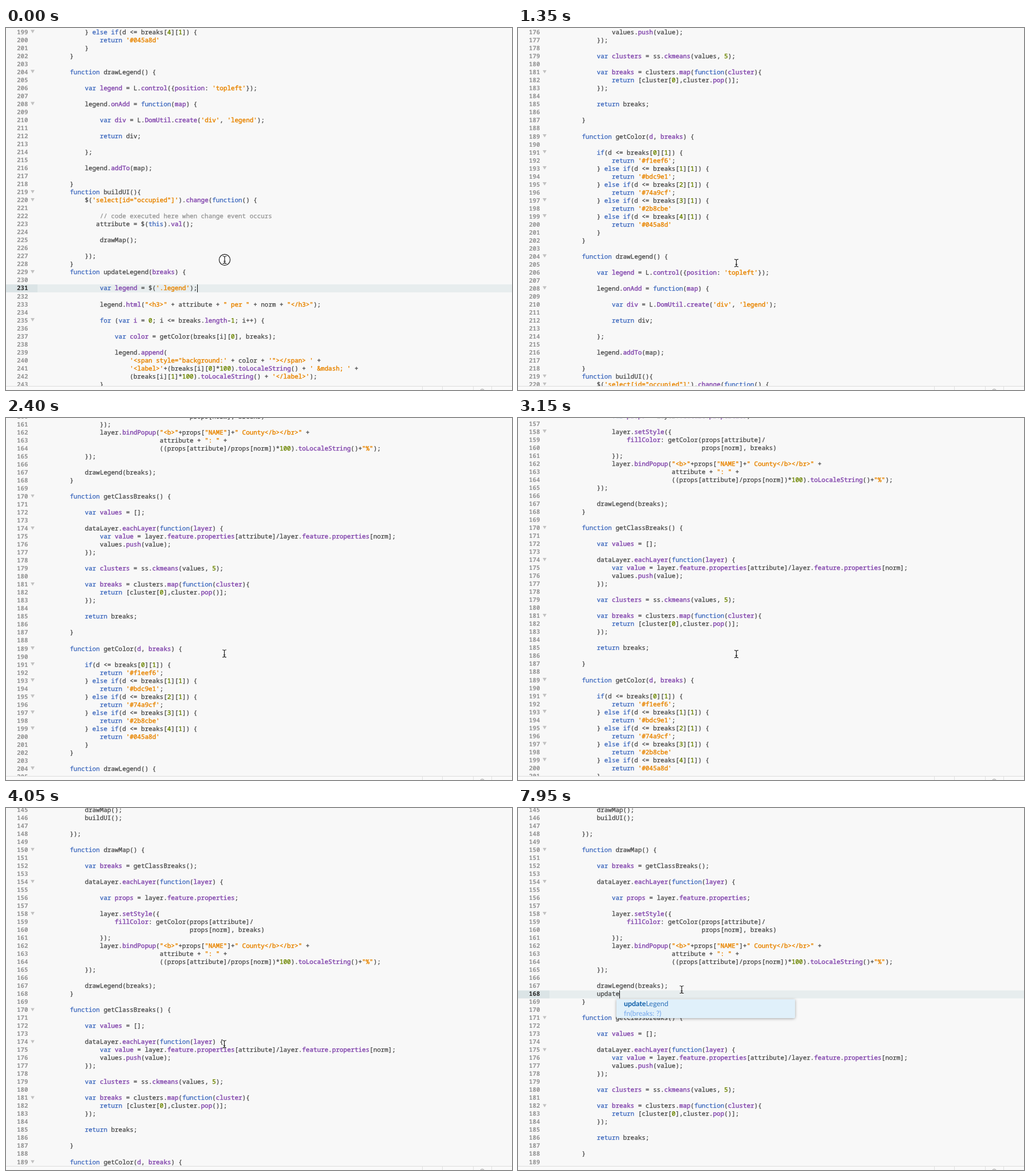
An HTML page for the animation above (8 s loop, 884x634 px).

```html
<!DOCTYPE html>
<html lang="en">
<head>
<meta charset="utf-8">
<title>Code editor</title>
<style>
  html, body { margin: 0; width: 100%; height: 100%; overflow: hidden; background: #f8f8f8; }
  #stage { position: relative; width: 884px; height: 634px; overflow: hidden; background: #f8f8f8;
    font: 500 10.92px/14.023px "Noto Sans Mono", monospace; color: #484848;
    text-rendering: geometricPrecision; font-variant-ligatures: none; }
  #stage div { position: absolute; }
  #view { left: 0; top: 0; width: 884px; height: 627px; overflow: hidden; }
  #doc, #tail { left: 0; top: 0; width: 884px; }
  .row, .num { margin-top: .5px; height: 14.023px; }
  .row { left: 59.2px; white-space: pre; -webkit-text-stroke: .3px; }
  .num { left: 0; width: 38.6px; text-align: right; font-weight: 600; color: #949494; }
  .num.on { color: #2b2b2b; }
  .fold { left: 43px; width: 7px; height: 6px; background: #c2c2c2; clip-path: polygon(0 0, 100% 0, 50% 100%); }
  #band { left: 0; width: 884px; height: 14.023px; background: linear-gradient(90deg, #dbe4e6 55px, #e7edee 55px); }
  #caret { width: 1px; height: 14.023px; background: #111; }
  .keyword { color: #3a66bd; } .def { color: #8449ae; } .string { color: #e88501; }
  .number { color: #6d8600; } .comment { color: #949494; }
  .def, .string, .number { -webkit-text-stroke: .45px; }
  #popup { left: 172px; top: 335px; width: 312px; background: #fff; border-radius: 0 0 3px 3px; overflow: hidden;
    box-shadow: 0 1px 5px rgba(0,0,0,.35); font: 400 12.4px/16.7px Lato, sans-serif; color: #454545; }
  #popup p { margin: 0; padding-left: 13px; height: 16.7px; }
  #popup .pick { background: #e0f0fa; color: #2a6fb8; }
  #popup b { color: #095ca8; }
  #popup .hint { color: #6fa3ea; }
  #status { left: 0; top: 627px; width: 884px; height: 7px; background: #fafafa; border-top: 1px solid #dcdcdc; }
  .sep { top: 0; width: 1px; height: 7px; background: #e0e0e0; }
  #lamp { left: 827px; top: 4px; width: 8px; height: 8px; border: 1px solid #999; border-radius: 50%; }
  #mouse { position: absolute; left: -14px; top: -14px; overflow: visible; }
</style>
</head>
<body>
<div id="stage">
  <div id="view">
    <div id="doc"><div id="band"></div><div id="tail"></div><div id="caret"></div></div>
  </div>
  <div id="status"><div id="lamp"></div></div>
  <div id="popup"></div>
  <svg id="mouse" width="28" height="28" viewBox="-14 -14 28 28" fill="none">
    <defs><path id="beam" d="M-3.5-6.5Q-.5-6.5 0-5Q.5-6.5 3.5-6.5M0-5V5M-3.5 6.5Q-.5 6.5 0 5Q.5 6.5 3.5 6.5M-1.8 2.5H1.8"/></defs>
    <circle id="ring" r="9.6" fill="#fff" fill-opacity=".7" stroke="#222" stroke-width="1.2"/>
    <use href="#beam" stroke="#fff" stroke-width="2.6"/>
    <use href="#beam" stroke="#1c1c1c" stroke-width="1.2"/>
  </svg>
</div>
<script>
const SOURCE = String.raw`
            drawMap();
            buildUI();

        });

        function drawMap() {

            var breaks = getClassBreaks();

            dataLayer.eachLayer(function(layer) {

                var props = layer.feature.properties;

                layer.setStyle({
                    fillColor: getColor(props[attribute]/
                                        props[norm], breaks)
                });
                layer.bindPopup("<b>"+props["NAME"]+" County</b></br>" +
                                attribute + ": " +
                                ((props[attribute]/props[norm])*100).toLocaleString()+"%");
            });

            drawLegend(breaks);
        }

        function getClassBreaks() {

            var values = [];

            dataLayer.eachLayer(function(layer) {
                var value = layer.feature.properties[attribute]/layer.feature.properties[norm];
                values.push(value);
            });

            var clusters = ss.ckmeans(values, 5);

            var breaks = clusters.map(function(cluster){
                return [cluster[0],cluster.pop()];
            });

            return breaks;

        }

        function getColor(d, breaks) {

            if(d <= breaks[0][1]) {
                return '#f1eef6';
            } else if(d <= breaks[1][1]) {
                return '#bdc9e1';
            } else if(d <= breaks[2][1]) {
                return '#74a9cf';
            } else if(d <= breaks[3][1]) {
                return '#2b8cbe'
            } else if(d <= breaks[4][1]) {
                return '#045a8d'
            }
        }

        function drawLegend() {

            var legend = L.control({position: 'topleft'});

            legend.onAdd = function(map) {

                var div = L.DomUtil.create('div', 'legend');

                return div;

            };

            legend.addTo(map);

        }
        function buildUI(){
            $('select[id="occupied"]').change(function() {

                // code executed here when change event occurs
               attribute = $(this).val();

                drawMap();

            });
        }
        function updateLegend(breaks) {

                var legend = $('.legend');

                legend.html("<h3>" + attribute + " per " + norm + "</h3>");

                for (var i = 0; i <= breaks.length-1; i++) {

                    var color = getColor(breaks[i][0], breaks);

                    legend.append(
                        '<span style="background:' + color + '"></span> ' +
                        '<label>'+(breaks[i][0]*100).toLocaleString() + ' &mdash; ' +
                        (breaks[i][1]*100).toLocaleString() + '</label>');
                }`.split('\n').slice(1);

const FIRST = 145, PITCH = 14.023, CHAR = 6.552, LEFT = 59.2;
const LOOP = 8000, STEP = 150, NEWLINE = 6750;
const TOKEN = /(?<comment>\/\/.*)|(?<string>"[^"]*"|'[^']*')|(?<keyword>\b(?:var|function|return|if|else|for|this)\b)|(?<def>(?<=var |\.|function[ \w]*\([^)]*)[A-Za-z]\w*|\w+(?=:))|(?<number>\b\d+\b)/g;

// Vertical centre of the first line, as [ms, y].
const SCROLL = [[0, -750], [150, -735], [300, -690], [600, -575], [750, -535], [900, -505], [1050, -482],
  [1200, -460], [1350, -427.2], [1500, -375], [1650, -320], [1800, -280], [1950, -253], [2100, -236],
  [2250, -223], [2400, -213], [2700, -204], [3000, -204], [3150, -158], [3300, -88], [3450, -41],
  [3600, -18], [3750, -6], [3900, 1], [4050, 3.5]];
const POINTER = [[0, 382, 406], [1050, 381.5, 411.5], [2400, 381.5, 412.5], [3450, 381.5, 413.5],
  [4050, 381.5, 413.5], [5100, 277, 307], [5250, 279.5, 311.5], [5550, 286, 318]];
const TYPED = [[0, ''], [7500, 'u'], [7650, 'up'], [7800, 'upda'], [7950, 'update']];
const MATCHES = ['unescape', 'URLSearchParams', 'onkeyup', 'onmouseup', 'onpointerup', 'SubtleCrypto', 'HTMLOptGroupElement'];

const $ = id => document.getElementById(id);
const lineTop = line => (line - FIRST) * PITCH;
const between = (t, a, b) => t >= a && t < b;
const smooth = p => p * p * (3 - 2 * p);
const latest = (table, t) => table.filter(([at]) => at <= t).pop()[1];

function add(parent, cls, text = '', top = 0, tag = 'div') {
  const node = document.createElement(tag);
  node.className = cls;
  node.textContent = text;
  if (top) node.style.top = top + 'px';
  parent.append(node);
  return node;
}

function highlight(row, text) {
  let end = 0;
  for (const match of text.matchAll(TOKEN)) {
    const kind = Object.keys(match.groups).find(name => match.groups[name] !== undefined);
    row.append(text.slice(end, match.index));
    add(row, kind, match[0], 0, 'span');
    end = match.index + match[0].length;
  }
  row.append(text.slice(end));
}

function track(keys, t, ease = p => p) {
  const next = keys.findIndex(([at]) => at > t);
  if (next < 0) return keys.at(-1).slice(1);
  const [a, b] = [keys[next - 1], keys[next]];
  const p = ease((t - a[0]) / (b[0] - a[0]));
  return a.slice(1).map((v, i) => v + (b[i + 1] - v) * p);
}

const numbers = SOURCE.map((text, i) => {
  const line = FIRST + i, top = lineTop(line);
  const parent = line < 168 ? $('doc') : $('tail');
  highlight(add(parent, 'row', '', top), text);
  if (text.endsWith('{')) add(parent, 'fold', '', top + 3);
  return add($('doc'), 'num', line, top);
});
const typedRow = add($('doc'), 'row', '', lineTop(168));
for (const x of [727, 762, 816, 848]) add($('status'), 'sep').style.left = x + 'px';

function fillPopup(typed) {
  const popup = $('popup');
  popup.style.display = typed.length > 1 ? '' : 'none';
  popup.textContent = '';
  const pick = add(popup, 'pick', '', 0, 'p');
  add(pick, '', typed, 0, 'b');
  pick.append('updateLegend'.slice(typed.length));
  add(popup, 'pick hint', 'fn(breaks: ?)', 0, 'p');
  if (typed === 'up') MATCHES.forEach(name => add(popup, '', name, 0, 'p'));
}

let shown;
function draw(t) {
  const typed = latest(TYPED, t);
  const line = t < 5250 ? 231 : t < NEWLINE ? 167 : 168;
  const column = { 231: 42, 167: 31, 168: 12 + typed.length }[line];

  $('doc').style.transform = `translateY(${track(SCROLL, t)[0] - PITCH / 2}px)`;
  $('tail').style.top = (t < NEWLINE ? 0 : PITCH) + 'px';
  $('band').style.top = $('caret').style.top = lineTop(line) + 'px';
  $('caret').style.left = LEFT + column * CHAR - .3 + 'px';
  $('caret').style.visibility = between(t, 5850, 6450) || between(t, 7200, 7500) ? 'hidden' : '';
  numbers.forEach((node, i) => node.classList.toggle('on', FIRST + i === line));

  if (typed !== shown) {
    typedRow.textContent = ' '.repeat(12) + typed;
    fillPopup(typed);
    shown = typed;
  }

  const [x, y] = track(POINTER, t, smooth);
  $('mouse').style.transform = `translate(${x}px, ${y}px)`;
  $('ring').style.display = t < 150 || between(t, 5250, 5400) ? '' : 'none';
}

const start = performance.now();
function tick() {
  const t = (performance.now() - start) % LOOP;
  draw(Math.floor(t / STEP) * STEP);
  requestAnimationFrame(tick);
}
tick();
</script>
</body>
</html>
```
